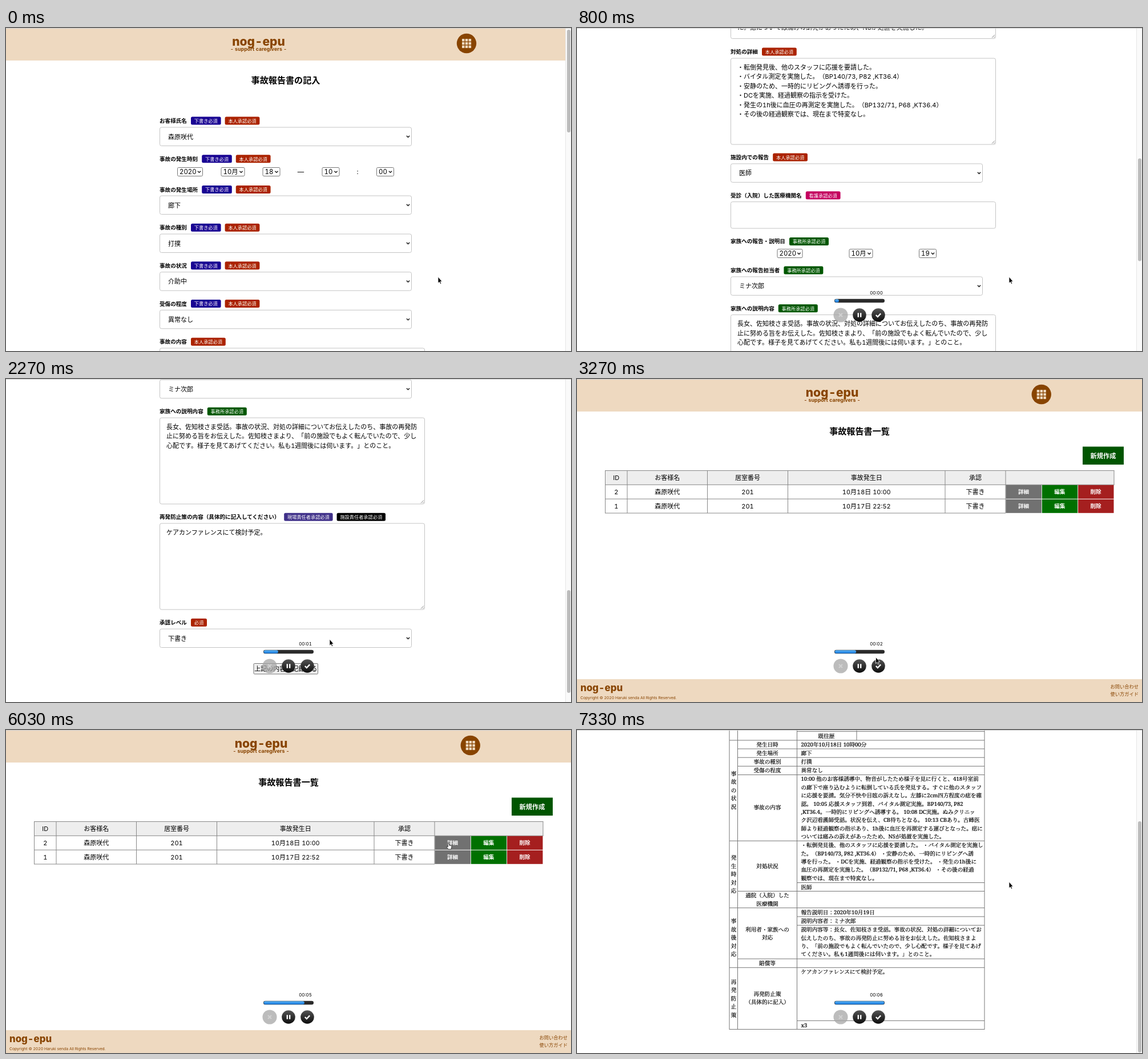
These frames come from a looping animation (990x566 px, 7.36 s). An HTML page:

```html
<!DOCTYPE html>
<html lang="ja">
<head>
<meta charset="utf-8">
<title>事故報告書</title>
<style>
html, body { margin: 0; width: 100%; height: 100%; overflow: hidden; background: #fff; }
svg { display: block; width: 990px; height: 566px; font-family: Inter, "Noto Sans CJK JP", "Noto Sans CJK", sans-serif; font-variant-numeric: tabular-nums; text-spacing-trim: space-all; }
#report { font-family: "Noto Serif", "Noto Serif CJK JP", "Noto Sans CJK JP", "Noto Sans CJK", serif; }
#report text { stroke: #000; stroke-width: .22px; }
</style>
</head>
<body>
<svg id="stage" viewBox="0 0 990 566"></svg>
<script>
const LOOP = 7360, LIST_AT = 3250, REPORT_AT = 6400;
const BROWN = '#884400', SAND = '#eed9c0';
const MID = 'text-anchor="middle"', END = 'text-anchor="end"', BOLD = 'font-weight="700"';
const BRAND = 'nog-epu', CLIENT = '森原咲代', STAFF = 'ミナ次郎', FAMILY = '佐知枝';

// y is the middle of the line
const text = (x, y, str, size = 11, attrs = '') =>
  `<text x="${x}" y="${y + size * .37}" font-size="${size}" ${attrs}>${str}</text>`;
const lines = (x, y, rows, step, size, attrs) =>
  rows.map((row, i) => text(x, y + i * step, row, size, attrs)).join('');
const rect = (x, y, w, h, fill, attrs = '') =>
  `<rect x="${x}" y="${y}" width="${w}" height="${h}" fill="${fill}" ${attrs}/>`;
const path = (d, stroke, width = 1, attrs = '') =>
  `<path d="${d}" fill="none" stroke="${stroke}" stroke-width="${width}" ${attrs}/>`;

function header(shift, width) {
  let out = rect(0, 0, width, 57, SAND) +
    text(442.5 + shift, 23, BRAND, 21, `${MID} font-weight="800" fill="${BROWN}"`) +
    text(442.5 + shift, 36.5, '- support caregivers -', 8.9, `${MID} ${BOLD} fill="${BROWN}"`) +
    `<circle cx="${807 + shift * 1.5}" cy="27" r="17.2" fill="${BROWN}"/>`;
  for (let i = 0; i < 9; i++)
    out += rect(799 + shift * 1.5 + i % 3 * 5.8, 19 + (i / 3 | 0) * 5.8, 4.5, 4.5, SAND);
  return out;
}

const footer = (y, width) => rect(0, y, width, 40, SAND) + `<g fill="${BROWN}">` +
  text(6, y + 15, BRAND, 16.8, 'font-weight="800"') +
  text(6, y + 32, 'Copyright © 2020 Haruki senda All Rights Reserved.', 6.8) +
  text(width - 6, y + 13, 'お問い合わせ', 8.25, END) +
  text(width - 6, y + 26, '使い方ガイド', 8.25, END) + '</g>';

// Form page
const BADGES = {
  draft: ['下書き必須', '#190593'], person: ['本人承認必須', '#ab2300'],
  nurse: ['看護承認必須', '#c4005f'], office: ['事務所承認必須', '#005700'],
  site: ['現場責任者承認必須', '#3f3089'], head: ['施設責任者承認必須', '#000'],
  must: ['必須', '#ab2300']
};

function label(y, title, ...kinds) {
  let x = 269 + title.length * 9.6 + 7, out = text(269, y, title, 9.6, BOLD);
  for (const kind of kinds) {
    const [name, color] = BADGES[kind], w = name.length * 8.2 + 11.6;
    out += rect(x, y - 7, w, 14, color, 'rx="2.5"') + text(x + 5.8, y + .3, name, 8.2, 'fill="#fff"');
    x += w + 7;
  }
  return out;
}

const chevron = (x, y) => path(`M${x - 2.6} ${y - 1.3}l2.6 2.6 2.6-2.6`, '#222', 1.5);
const frame = (y, w, h) => rect(269.5, y, w, h, '#fff', 'stroke="#c4c4c4" rx="3"');
const select = (y, value) => frame(y, 441, 32.5) + text(284, y + 16.5, value) + chevron(704.5, y + 16.2);
const mini = (x, y, w, value) => rect(x, y - 7.5, w, 15, '#fff', 'stroke="#767676" rx="2"') +
  text(x + 3.5, y, value, 11.4) + chevron(x + w - 6, y);
const area = (y, rows) => frame(y, 464, 151) + lines(281, y + 15.5, rows, 16.5, 11) +
  path(`M727 ${y + 149.5}l5-5M730.3 ${y + 149.5}l1.8-1.8`, '#777', .9);

const familyNote = [
  `長女、${FAMILY}さま受話。事故の状況、対処の詳細についてお伝えしたのち、事故の再発防`,
  `止に努める旨をお伝えした。${FAMILY}さまより、「前の施設でもよく転んでいたので、少し`,
  '心配です。様子を見てあげてください。私も1週間後には伺います。」とのこと。'
];

const form = header(0, 980) +
  text(490, 91.5, '事故報告書の記入', 15.1, `${MID} ${BOLD}`) +
  label(162.5, 'お客様氏名', 'draft', 'person') + select(174, CLIENT) +
  label(229.3, '事故の発生時刻', 'draft', 'person') +
  mini(300.5, 252, 44, '2020') + mini(377, 252, 41, '10月') + mini(450, 252, 30, '18') +
  text(516.5, 252, '—', 11.4, MID) + mini(554, 252, 30, '10') + text(616, 252, ':', 11.4, MID) + mini(649.5, 252, 30, '00') +
  label(283, '事故の発生場所', 'draft', 'person') + select(294, '廊下') +
  label(349.7, '事故の種別', 'draft', 'person') + select(361, '打撲') +
  label(416.3, '事故の状況', 'draft', 'person') + select(427.7, '介助中') +
  label(483, '受傷の程度', 'draft', 'person') + select(494.3, '異常なし') +
  label(549.7, '事故の内容', 'person') + area(561, [
    '10:00 他のお客様誘導中、物音がしたため様子を見に行くと、418号室前の廊下で座り込',
    'むように転倒している氏を発見する。すぐに他のスタッフに応援を要請。気分不快や目眩',
    'の訴えなし。左膝に2cm四方程度の痣を確認。',
    '10:05 応援スタッフ到着、バイタル測定実施。BP140/73, P82 ,KT36.4。一時的にリビ',
    'ングへ誘導する。',
    '10:08 DC実施。ぬみクリニック沢辺看護師受話。状況を伝え、CB待ちとなる。',
    '10:13 CBあり。古峰医師より経過観察の指示あり、1h後に血圧を再測定する運びとなっ',
    'た。痣については痛みの訴えがあったため、NSが処置を実施した。'
  ]) +
  label(735, '対処の詳細', 'person') + area(746.5, [
    '・転倒発見後、他のスタッフに応援を要請した。',
    '・バイタル測定を実施した。（BP140/73, P82 ,KT36.4）',
    '・安静のため、一時的にリビングへ誘導を行った。',
    '・DCを実施、経過観察の指示を受けた。',
    '・発生の1h後に血圧の再測定を実施した。（BP132/71, P68 ,KT36.4）',
    '・その後の経過観察では、現在まで特変なし。'
  ]) +
  label(920, '施設内での報告', 'person') + select(931.3, '医師') +
  label(986.7, '受診（入院）した医療機関名', 'nurse') + frame(998, 464, 46.5) +
  label(1067.3, '家族への報告・説明日', 'office') +
  mini(351, 1088.5, 44, '2020') + mini(477, 1088.5, 41, '10月') + mini(599.5, 1088.5, 30, '19') +
  label(1118, '家族への報告担当者', 'office') + select(1129.3, STAFF) +
  label(1184.7, '家族への説明内容', 'office') + area(1196, familyNote) +
  label(1369.7, '再発防止策の内容（具体的に記入してください）', 'site', 'head') +
  area(1381, ['ケアカンファレンスにて検討予定。']) +
  label(1554.7, '承認レベル', 'must') + select(1566, '下書き') +
  rect(434, 1626.5, 112.5, 18.5, '#efefef', 'stroke="#767676" rx="1.5"') +
  text(490.3, 1636, '上記の内容で記録する', 11, MID) + footer(1701, 980);

// List page
const COLS = [49.5, 88, 228.5, 369.5, 645, 751, 941];
const tableRow = (y, cells) => cells.map((c, i) => text((COLS[i] + COLS[i + 1]) / 2, y, c, 11, MID)).join('');
const actions = y => [['詳細', '#717171'], ['編集', '#007000'], ['削除', '#a51f1f']].map(([name, color], i) =>
  rect(751.5 + i * 63.3, y, 62.4, 24, color) + text(782.5 + i * 63.3, y + 12, name, 9.6, `${MID} ${BOLD} fill="#fff"`)).join('');

const list = header(4.5, 990) +
  text(495, 91.5, '事故報告書一覧', 15.1, `${MID} ${BOLD}`) +
  rect(886, 118.5, 72, 31.5, '#005500') + text(922, 134.5, '新規作成', 11.2, `${MID} ${BOLD} fill="#fff"`) +
  rect(49.5, 160.5, 891.5, 24.8, '#eee') +
  path('M49 160.5H941.5M49 185.3H941.5M49 210.2H751M49 235H751' + COLS.map((x, i) =>
    `M${x} 160.5V${i == 6 ? 185.3 : 235}`).join(''), '#888') +
  tableRow(173, ['ID', 'お客様名', '居室番号', '事故発生日', '承認']) +
  tableRow(197.7, ['2', CLIENT, '201', '10月18日 10:00', '下書き']) +
  tableRow(222.5, ['1', CLIENT, '201', '10月17日 22:52', '下書き']) +
  actions(185.8) + actions(210.8) + footer(526, 990);

// Report page
const across = (x, ys) => ys.map(y => `M${x} ${y}H714`).join('');
const side = (y, word) => lines(274.5, y, [...word], 14.5, 9.6, MID);
const name = (y, ...rows) => lines(333.5, y, rows, 14.5, 9.6, MID);
const value = (y, ...rows) => lines(392.5, y, rows, 14.45, 9.6);
const abilities = ['要介護度', '認知機能', '移動機能', '既往歴'];

const report =
  text(490, 34, '介護事業者事故報告書', 15.1, `${MID} ${BOLD}`) +
  text(503, 63, '報告年月日：', 9.6) + text(607, 63, '年', 9.6, MID) + text(658, 63, '月', 9.6, MID) + text(709, 63, '日', 9.6, MID) +
  path(across(267, [74.5, 120.3, 232, 408.3, 525.7, 630.3, 738.5]) +
    across(281.5, [89.7, 105, 137.5, 153, 170.8, 247, 262.2, 277.4, 292.5, 496.5, 615]) +
    across(385.5, [186, 201.3, 216.6, 481.5, 541, 556.2, 723.4]) +
    [267, 281.5, 385.5, 714].map(x => `M${x} 74V739`).join('') +
    [596, 652].map(x => `M${x} 120.3V137.5M${x} 153V170.8`).join('') + 'M490 170.8V232', '#777') +
  side(83, '事業所') + side(161, '利用者') + side(290, '事故の状況') +
  side(437.5, '発生時対応') + side(548.5, '事故後対応') + side(655, '再発防止策') +
  name(82, '事業所名') + value(82, 'a3') +
  name(97.3, '事業所番号') + value(97.3, 'b3') +
  name(112.5, '報告者') + value(112.5, '柏谷良継') +
  name(128.8, '氏名') + value(128.8, CLIENT) + text(623, 128.8, '性別', 9.6, MID) + text(658, 128.8, '女性', 9.6) +
  name(145.3, '保険者番号') +
  name(162, '入居年月日') + value(162, '2020年10月04日') + text(623, 162, '居室番号', 9.6, MID) + text(658, 162, '201', 9.6) +
  name(201.3, '身体状況等') + lines(437, 178.5, abilities, 15.2, 9.6, MID) + lines(497, 178.5, ['自立', '自立', '自立'], 15.2, 9.6) +
  name(239, '発生日時') + value(239, '2020年10月18日 10時00分') +
  name(254.4, '発生場所') + value(254.4, '廊下') +
  name(269.3, '事故の種別') + value(269.3, '打撲') +
  name(284.5, '受傷の程度') + value(284.5, '異常なし') +
  name(349.7, '事故の内容') + value(299.6,
    '10:00 他のお客様誘導中、物音がしたため様子を見に行くと、418号室前',
    'の廊下で座り込むように転倒している氏を発見する。すぐに他のスタッフ',
    'に応援を要請。気分不快や目眩の訴えなし。左膝に2cm四方程度の痣を確',
    '認。 10:05 応援スタッフ到着、バイタル測定実施。BP140/73, P82',
    ',KT36.4。一時的にリビングへ誘導する。 10:08 DC実施。ぬみクリニッ',
    'ク沢辺看護師受話。状況を伝え、CB待ちとなる。 10:13 CBあり。古峰医',
    '師より経過観察の指示あり、1h後に血圧を再測定する運びとなった。痣に',
    'ついては痛みの訴えがあったため、NSが処置を実施した。') +
  name(452, '対処状況') + value(415.5,
    '・転倒発見後、他のスタッフに応援を要請した。 ・バイタル測定を実施し',
    'た。（BP140/73, P82 ,KT36.4） ・安静のため、一時的にリビングへ誘',
    '導を行った。 ・DCを実施、経過観察の指示を受けた。 ・発生の1h後に',
    '血圧の再測定を実施した。（BP132/71, P68 ,KT36.4） ・その後の経過',
    '観察では、現在まで特変なし。') +
  value(489, '医師') + name(503.7, '通院（入院）した', '医療機関') +
  value(533.4, '報告説明日：2020年10月19日') + value(548.6, `説明内容者：${STAFF}`) +
  name(563, '利用者・家族への', '対応') + value(563.5,
    `説明内容等：長女、${FAMILY}さま受話。事故の状況、対処の詳細についてお`,
    `伝えしたのち、事故の再発防止に努める旨をお伝えした。${FAMILY}さまよ`,
    'り、「前の施設でもよく転んでいたので、少し心配です。様子を見てあげ',
    'てください。私も1週間後には伺います。」とのこと。') +
  name(622.5, '賠償等') + name(676.3, '再発防止策', '（具体的に記入）') +
  value(637.3, 'ケアカンファレンスにて検討予定。') + value(731, 'x3');

// Recorder controls
const hud =
  text(524.5, 464.5, '', 7.9, `id="clock" ${MID} stroke="#fff" stroke-width="2" paint-order="stroke"`) +
  rect(451, 474.7, 88, 6.6, '#2b2b2b', 'rx="3.3"') +
  rect(451.6, 475.2, 0, 5.6, 'url(#blue)', 'id="fill" rx="2.8"') +
  '<circle cx="462" cy="503" r="12.6" fill="#a6a6a6" opacity=".75"/>' +
  path('M459 500l6 6m0-6l-6 6', '#d0d0d0', 2.4) +
  [495, 528].map(x => `<circle cx="${x}" cy="503" r="11.8" fill="url(#dark)"/>`).join('') +
  rect(491.6, 499.3, 2.4, 7.4, '#fff') + rect(496, 499.3, 2.4, 7.4, '#fff') +
  path('M523.8 503l3 3 5.4-5.6', '#fff', 2.3);

const gradient = (id, a, b) => `<linearGradient id="${id}" x2="0" y2="1"><stop stop-color="${a}"/><stop offset="1" stop-color="${b}"/></linearGradient>`;
const $ = id => document.getElementById(id);

$('stage').innerHTML = `<defs>${gradient('blue', '#5bb4f8', '#1477dc')}${gradient('dark', '#555', '#0c0c0c')}</defs>
  <g id="form">${form}</g><g id="list">${list}</g><g id="report">${report}</g>
  <g id="bar">${rect(980, 0, 10, 566, '#fafafa')}${path('M980.5 0V566', '#e6e6e6')}${rect(983, 0, 6, 180, '#bcbcbc', 'id="thumb" rx="3"')}</g>
  ${rect(0, 0, 990, 1, '#d2d2d2')}<g id="hud">${hud}</g>
  <g id="pointer" stroke="#fff" stroke-width=".8">
    <path id="arrow" d="M0 -1V10.2L2.4 8 4 11.6 5.7 10.8 4.1 7.3H7.2Z"/>
    <path id="hand" fill="#fff" stroke="#222" d="M-1.6 1Q-1.6 0-.6 0T.5 1V4L4 4.8Q5 5 5 6.2L4 11H-1L-4 7Q-4 5.6-2.8 6L-1.6 7Z"/>
  </g>`;

const POINTER = [[0, 757, 437], [1550, 757, 437], [2270, 567, 457], [2700, 508, 505], [3150, 508, 505],
  [3950, 759, 236], [4600, 759, 236], [5300, 776, 198], [6200, 776, 198], [6700, 757, 267], [LOOP, 757, 267]];

function ease(t, from, to) {
  const u = Math.min(1, Math.max(0, (t - from) / (to - from)));
  return u * u * (3 - 2 * u);
}

function draw(t) {
  const page = t < LIST_AT ? 'form' : t < REPORT_AT ? 'list' : 'report';
  for (const id of ['form', 'list', 'report']) $(id).style.display = id == page ? '' : 'none';

  const isForm = page == 'form';
  const scroll = isForm ? 1128 * ease(t, 60, 1344) : 214 * ease(t, 6830, 7280);
  if (page != 'list') $(page).setAttribute('transform', `translate(0 ${-scroll})`);
  $('bar').style.display = page == 'list' ? 'none' : '';
  $('thumb').setAttribute('y', 3 + scroll * (isForm ? 367 / 1128 : 157 / 214));
  $('thumb').setAttribute('height', isForm ? 180 : 405);

  $('hud').setAttribute('opacity', ease(t, 100, 300));
  $('clock').textContent = '00:0' + Math.max(0, Math.floor((t - 380) / 1000));
  $('fill').setAttribute('width', Math.min(86.8, Math.max(0, t / LOOP * 90 - 2.5)));

  const i = POINTER.findIndex(k => k[0] > t);
  const [t0, x0, y0] = POINTER[i - 1], [t1, x1, y1] = POINTER[i], u = ease(t, t0, t1);
  const x = x0 + (x1 - x0) * u, y = y0 + (y1 - y0) * u;
  const pointing = page == 'list' && x > 751 && y < 233;
  $('pointer').setAttribute('transform', `translate(${x} ${y})`);
  $('hand').style.display = pointing ? '' : 'none';
  $('arrow').style.display = pointing ? 'none' : '';
}

const start = performance.now();
function tick() {
  draw((performance.now() - start) % LOOP);
  requestAnimationFrame(tick);
}
tick();
</script>
</body>
</html>
```
